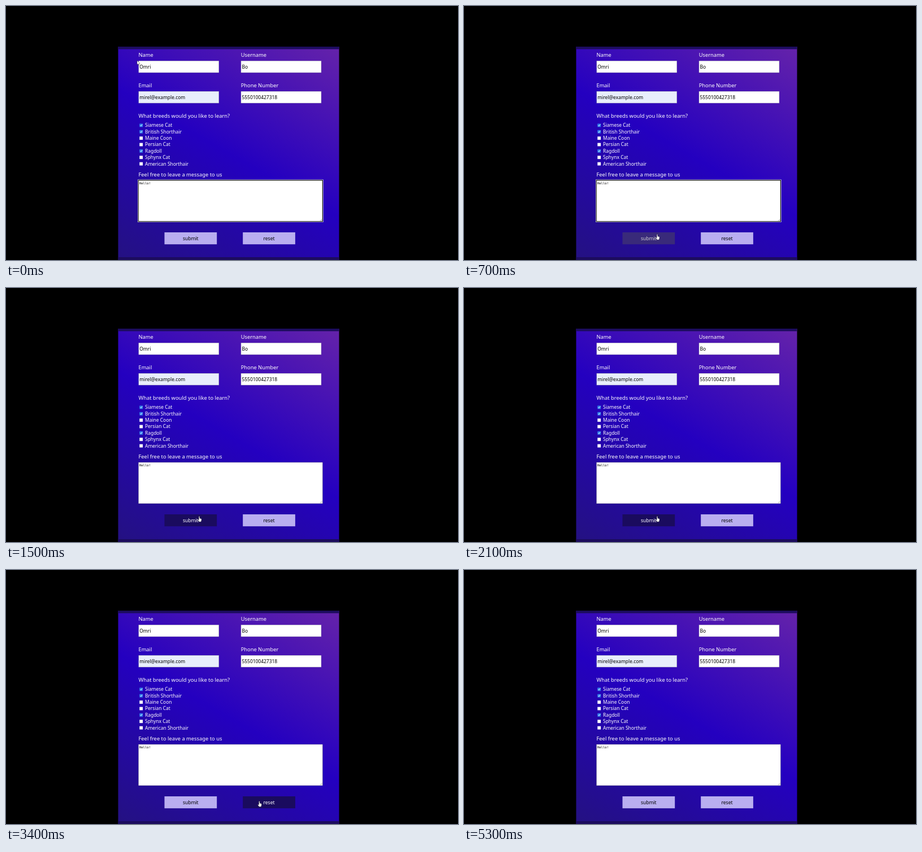
An HTML page with a canvas for the animation above (5600 ms loop, 800 by 450 pixels).

```html
<!DOCTYPE html>
<html lang="en">
<head>
<meta charset="utf-8">
<title>Contact form</title>
<style>
  html, body { margin: 0; width: 100%; height: 100%; overflow: hidden; background: #000; }
  canvas { display: block; }
</style>
</head>
<body>
<canvas id="stage" width="800" height="450"></canvas>
<script>
const ctx = document.getElementById('stage').getContext('2d');
const LOOP = 5600, STEP = 100;
const SANS = '"Noto Sans", sans-serif';
const LIGHT = [185, 174, 240], DARK = [26, 11, 94];
const BLACK = [0, 0, 0], WHITE = [255, 255, 255];

const FIELDS = [
  ['Name', 'Omri', 234.5, 97],
  ['Username', 'Bo', 415.7, 97],
  ['Email', 'mirel@example.com', 234.5, 151, '#e8eefc'],
  ['Phone Number', '5550100427318', 415.7, 151]
];
const BREEDS = ['Siamese Cat', 'British Shorthair', 'Maine Coon', 'Persian Cat',
  'Ragdoll', 'Sphynx Cat', 'American Shorthair'];
const CHECKED = ['Siamese Cat', 'British Shorthair', 'Ragdoll'];

// Pointer tip positions and hover intervals
const START = [232, 96.5], SUBMIT = [342, 404.5], RESET = [448.3, 409.7], EXIT = [556, 302];
const HOVER = { submit: [500, 2400], reset: [2450, 4850] };
const FADE = 300, BLUR_AT = 900, GONE_AT = 5100;

const clamp = p => Math.min(1, Math.max(0, p));
const lerp = (a, b, p) => a + (b - a) * p;
const mix = (a, b, p) => `rgb(${a.map((v, i) => Math.round(lerp(v, b[i], p)))})`;
const fade = p => 1 - (1 - clamp(p)) ** 1.5;
const easeOut = p => 1 - (1 - clamp(p)) ** 2;

function rect(x, y, w, h, color) {
  ctx.fillStyle = color;
  ctx.fillRect(x, y, w, h);
}

function text(str, x, y, size, color = '#fff', align = 'left', family = SANS) {
  ctx.font = `${size}px ${family}`;
  ctx.textAlign = align;
  ctx.fillStyle = color;
  ctx.fillText(str, x, y);
}

function shape(points, x, y) {
  ctx.beginPath();
  points.forEach(([px, py]) => ctx.lineTo(x + px, y + py));
  ctx.closePath();
  ctx.fillStyle = '#fff';
  ctx.strokeStyle = 'rgba(0,0,0,0.65)';
  ctx.lineWidth = 0.6;
  ctx.lineJoin = 'round';
  ctx.fill();
  ctx.stroke();
}

function line(points, color, width) {
  ctx.beginPath();
  points.forEach(([x, y]) => ctx.lineTo(x, y));
  ctx.strokeStyle = color;
  ctx.lineWidth = width;
  ctx.stroke();
}

function drawCard() {
  const g = ctx.createLinearGradient(265, 484, 523, 38);
  g.addColorStop(0, 'rgb(36,17,130)');
  g.addColorStop(0.5, 'rgb(36,0,192)');
  g.addColorStop(1, 'rgb(100,34,170)');
  rect(198.5, 72, 391, 378, g);
  rect(198.5, 72, 391, 4.5, '#1c0c5e');
  rect(198.5, 445, 391, 5, '#1c0c5e');
}

function drawField([label, value, x, y, fill = '#fff']) {
  text(label, x, y - 7.3, 9.3);
  rect(x, y, 142.5, 21.3, '#8a84a8');
  rect(x + 0.5, y + 0.5, 141.5, 20.3, fill);
  text(value, x + 1.7, y + 13.9, 8.45, '#000');
}

function drawBreed(name, i) {
  const y = 211.3 + i * 11.37;
  const on = CHECKED.includes(name);
  rect(236.3, y - 2.8, 5.8, 5.8, on ? '#2f7fee' : '#fff');
  if (on) line([[237.4, y + 0.1], [238.8, y + 1.5], [241.2, y - 1.6]], '#fff', 0.9);
  text(name, 246, y + 3, 8.45);
}

function drawMessage(focused) {
  text('Feel free to leave a message to us', 234.5, 301.6, 9.35);
  if (focused) {
    rect(233, 307.5, 328.6, 75.5, '#fff');
    rect(233.6, 308.1, 327.4, 74.3, '#101010');
    rect(234.8, 309.3, 325, 71.9, '#fff');
  } else {
    rect(234.3, 308.7, 326.3, 73.4, '#77728f');
    rect(234.8, 309.2, 325.3, 72.4, '#fff');
  }
  text('Hello!', 235.8, 315.7, 5.6, '#000', 'left', '"DejaVu Sans Mono", monospace');
  line([[556, 380.8], [559.4, 377.4]], '#777', 0.6);
  line([[558, 380.8], [559.4, 379.4]], '#777', 0.6);
}

function drawButton(label, x, t) {
  const [enter, leave] = HOVER[label];
  const hover = fade((t - enter) / FADE) - fade((t - leave) / FADE);
  rect(x, 401, 92.7, 21.2, mix(LIGHT, DARK, hover));
  text(label, x + 46.3, 414.8, 8.5, mix(BLACK, WHITE, hover), 'center');
}

function pointerAt(t) {
  const move = (a, b, p) => a.map((v, i) => lerp(v, b[i], p));
  if (t < 2300) return move(START, SUBMIT, easeOut(t / 500));
  if (t < 4800) return move(SUBMIT, RESET, easeOut((t - 2300) / 300));
  return move(RESET, EXIT, clamp((t - 4800) / 200));
}

function drawPointer(t) {
  if (t >= GONE_AT) return;
  const [x, y] = pointerAt(t);
  const overButton = y > 401 && y < 422 && (x < 373 || x > 419);
  if (overButton) {
    shape([[-0.8, 0.4], [0, -0.3], [0.8, 0.4], [0.9, 3.4], [3.6, 4.2], [4.2, 5],
      [3.9, 7.7], [3, 9.7], [-0.3, 9.7], [-2.6, 6.6], [-2.4, 5.6], [-0.8, 6.2]], x, y);
  } else {
    shape([[0, 0], [0, 7.4], [1.7, 5.9], [2.8, 8.4], [4, 7.9], [2.9, 5.5], [5.2, 5.3]], x, y);
  }
}

function draw(now) {
  const t = Math.floor((now % LOOP) / STEP) * STEP;
  rect(0, 0, 800, 450, '#000');
  drawCard();
  FIELDS.forEach(drawField);
  text('What breeds would you like to learn?', 234.5, 198, 9.35);
  BREEDS.forEach(drawBreed);
  drawMessage(t < BLUR_AT);
  drawButton('submit', 280.5, t);
  drawButton('reset', 419.2, t);
  drawPointer(t);
}

const origin = performance.now();
function tick() {
  draw(performance.now() - origin);
  requestAnimationFrame(tick);
}
tick();
</script>
</body>
</html>
```
